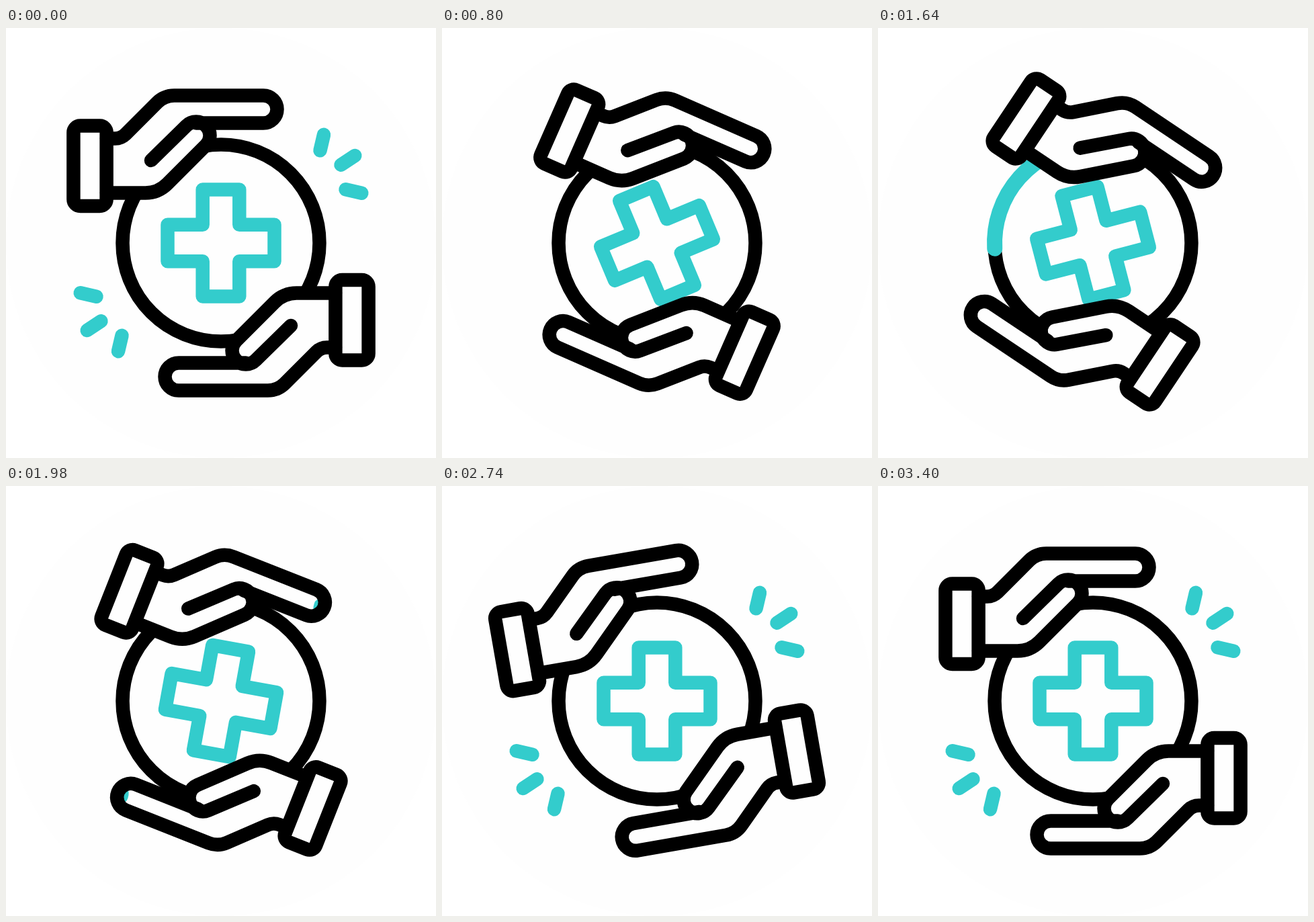
Recreate the animation shown at these times as an HTML page with a canvas. Size 640 px wide and 640 px high, loop 3.6 s.

```html
<!DOCTYPE html>
<html lang="en">
<head>
<meta charset="utf-8">
<title>Caring hands</title>
<style>
  html, body { margin: 0; width: 100%; height: 100%; overflow: hidden; background: #fff; }
  canvas { display: block; }
</style>
</head>
<body>
<canvas width="640" height="640"></canvas>
<script>
const ctx = document.querySelector('canvas').getContext('2d');
const LOOP = 3600, TEAL = '#33cccc', BLACK = '#000', PAPER = '#fefefe';
const LINE = 20.5, RADIUS = 146.5;

const finger = 'M150 164.5H162.5A22 22 0 0 0 178 158L225 111A36 36 0 0 1 250.5 100.5H383A20.5 20.5 0 0 1 383 141.5H283';
const thumbTip = 'A20.5 20.5 0 0 1 297.5 174.5';
const palm = 'L240 232A46 46 0 0 1 207.5 245.5H150';
const handFill = new Path2D(finger + thumbTip + palm + 'Z');
const handLines = new Path2D(finger + 'M216 197L268.5 145.5' + thumbTip + palm);
const cuff = new Path2D();
cuff.roundRect(100.4, 145.5, 49.2, 119.5, 10);
const cross = new Path2D('M-27.3-79.5H27.3V-27.3H79.5V27.3H27.3V79.5H-27.3V27.3H-79.5V-27.3H-27.3Z');

// Each ray runs from its inner to its outer end
const rays = [
  [467.5, 182.3, 473, 158.8],
  [498.5, 203.7, 519.3, 190],
  [505.5, 240.2, 529.3, 245.7]
];

const clamp = x => Math.min(1, Math.max(0, x));
const ramp = (t, from, to) => clamp((t - from) / (to - from));
const smooth = x => x * x * (3 - 2 * x);
const ease = (t, from, to) => smooth(ramp(t, from, to));
const rad = deg => deg * Math.PI / 180;

function stroke(path, color, width = LINE) {
  ctx.strokeStyle = color;
  ctx.lineWidth = width;
  ctx.stroke(path);
}

function arc(from, to, color, width) {
  const path = new Path2D();
  path.arc(320, 320, RADIUS, rad(from), rad(to));
  stroke(path, color, width);
}

// Runs draw upright and again turned by half a circle
function twice(draw, rise = 0) {
  for (const turn of [0, Math.PI]) {
    ctx.save();
    ctx.translate(320, 320 - rise);
    ctx.rotate(turn);
    ctx.translate(-320, -320);
    draw();
    ctx.restore();
  }
}

// Turn of the hands, their shift towards each other, and the rise of the pair
function handPose(t) {
  const angle = 35.7 * ease(t, 0, 1310) - 46.7 * ease(t, 1470, 2870) + 11 * ease(t, 2870, 3400);
  if (angle < 0) return { angle, dx: -0.39 * angle, dy: -0.39 * angle, rise: -0.07 * angle };
  const closing = smooth(clamp(angle / 30));
  return { angle, dx: 3.4 * Math.sin(Math.PI * angle / 30), dy: 20.8 * closing, rise: 2.1 * closing };
}

function placeHand({ angle, dx, dy }) {
  ctx.translate(320 + dx, 320 + dy);
  ctx.rotate(rad(angle));
  ctx.translate(-320, -320);
}

function fillHand(pose) {
  placeHand(pose);
  ctx.fillStyle = PAPER;
  ctx.fill(handFill);
  ctx.fill(cuff);
}

function strokeHand(pose) {
  placeHand(pose);
  stroke(handLines, BLACK);
  stroke(cuff, BLACK);
}

function drawRays(t) {
  rays.forEach(([x1, y1, x2, y2], i) => {
    const hidden = t < 1500 ? ramp(t, 10 + i * 240, 250 + i * 240) : 0;
    const shown = t < 1500 ? 1 : ramp(t, 1960 + i * 110, 2070 + i * 110);
    if (hidden >= shown) return;
    const path = new Path2D();
    path.moveTo(x1 + (x2 - x1) * hidden, y1 + (y2 - y1) * hidden);
    path.lineTo(x1 + (x2 - x1) * shown, y1 + (y2 - y1) * shown);
    stroke(path, TEAL);
  });
}

function drawCross(t) {
  ctx.save();
  ctx.translate(320, 320);
  ctx.rotate(rad(211 * (ease(t, 0, 1195) - ease(t, 1170, 2740))));
  stroke(cross, TEAL);
  ctx.restore();
}

function draw(t) {
  ctx.fillStyle = '#fff';
  ctx.fillRect(0, 0, 640, 640);
  ctx.fillStyle = PAPER;
  ctx.beginPath();
  ctx.arc(320, 320, 320, 0, 2 * Math.PI);
  ctx.fill();

  arc(0, 360, BLACK);
  const head = 80 + 205 * ease(t, 616, 1476);
  const tail = 80 + 205 * ease(t, 1227, 2087);
  if (head > tail) arc(tail, head, TEAL, 23);

  drawCross(t);
  const pose = handPose(t);
  twice(() => fillHand(pose), pose.rise);
  twice(() => drawRays(t));
  twice(() => strokeHand(pose), pose.rise);
}

ctx.lineCap = ctx.lineJoin = 'round';
const start = performance.now();
function tick() {
  draw((performance.now() - start) % LOOP);
  requestAnimationFrame(tick);
}
tick();
</script>
</body>
</html>
```
